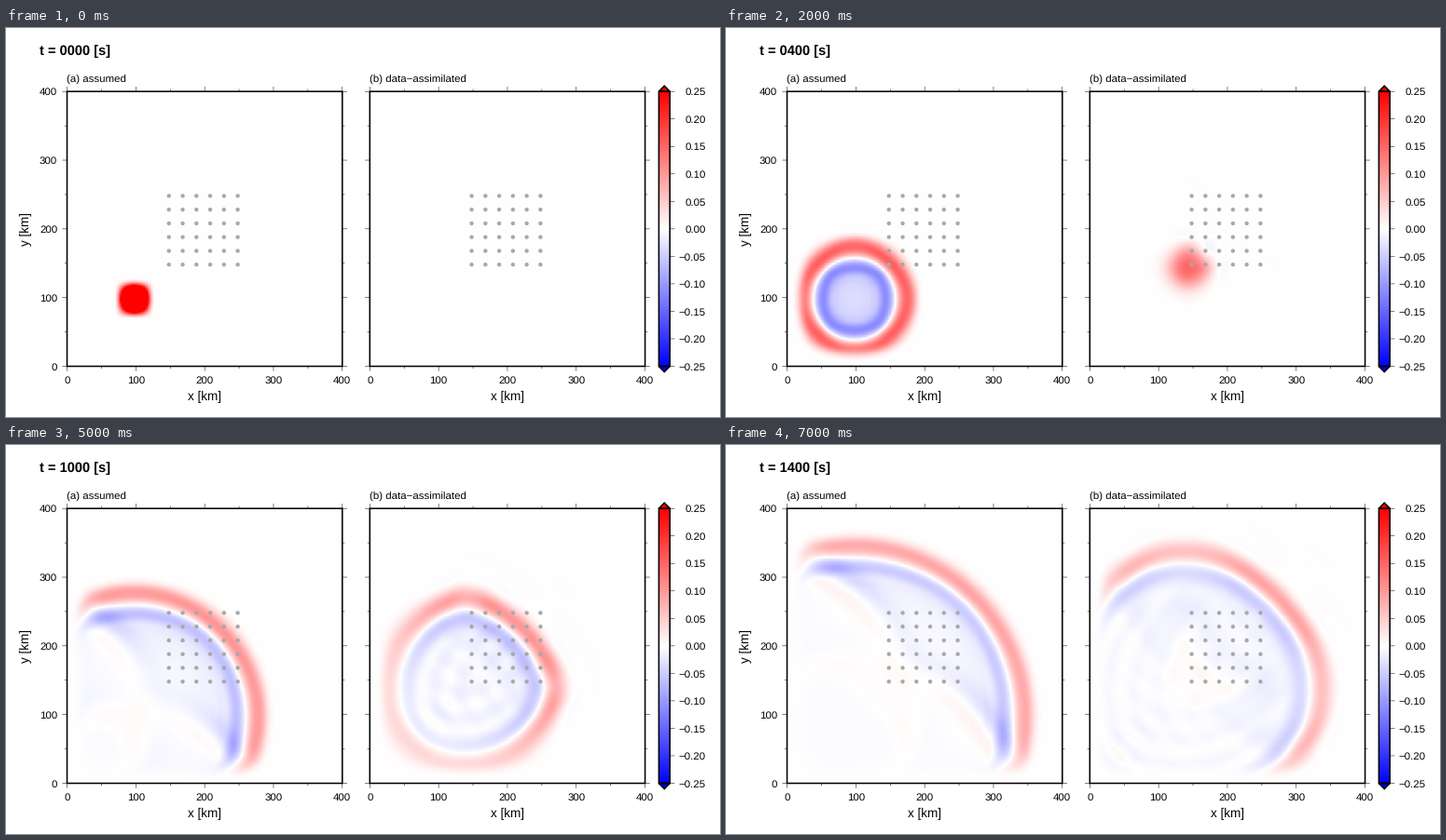
A matplotlib script that plays this animation: 766x418 px, repeating every 8 s.

```python
import math

import numpy as np
import matplotlib.pyplot as plt
from matplotlib.animation import FuncAnimation
from matplotlib.colors import LinearSegmentedColormap
from matplotlib.patches import Circle, Polygon, Rectangle

W, H, DPI = 766, 418, 64
FRAMES, INTERVAL = 8, 1000
STEPS = 200                     # simulated seconds per frame

# --- wave model: linear long waves on a staggered grid ---
N = 200                         # cells per side
DX, DT = 2000.0, 1.0            # metres, seconds
GRAVITY, DEPTH = 9.8, 3000.0
SPONGE, DAMP = 20, 0.015        # absorbing border: cells, strength
SOURCE, BUMP = 49, 30e3         # source cell, half width in metres
CORR = 20e3                     # correlation length of the assimilation
STATIONS = np.arange(74, 125, 10)


def source_profile():
    d = (np.arange(N) - SOURCE) * DX
    return np.where(abs(d) < BUMP, (1 + np.cos(np.pi * d / BUMP)) / 2, 0)


def sponge():
    edge = np.minimum(np.arange(1, N + 1), np.arange(N, 0, -1))
    g = np.exp(-(DAMP * np.clip(SPONGE - edge, 0, None)) ** 2)
    return np.outer(g, g).astype(np.float32)


def gain(rows, cols):
    """Optimal interpolation weights from the stations to every cell."""
    def cov(r, c):
        d2 = (r[:, None] - rows) ** 2 + (c[:, None] - cols) ** 2
        return np.exp(-d2 * (DX / CORR) ** 2)

    r, c = np.indices((N, N)).reshape(2, -1)
    inv = np.linalg.inv(cov(rows, cols) + np.eye(len(rows)))
    return (cov(r, c) @ inv).astype(np.float32)


def simulate():
    """Heights of the assumed and the assimilated sea at each frame."""
    rows, cols = (a.ravel() for a in np.meshgrid(STATIONS, STATIONS))
    weights, damp = gain(rows, cols), sponge()
    eta, u, v = np.zeros((3, 2, N, N), np.float32)
    p = source_profile()
    eta[0] = np.outer(p, p)
    a, b = np.float32(GRAVITY * DEPTH * DT / DX), np.float32(DT / DX)
    shots = [eta.copy()]
    for step in range(1, (FRAMES - 1) * STEPS + 1):
        u[:, :, 1:] -= a * (eta[:, :, 1:] - eta[:, :, :-1])
        v[:, 1:] -= a * (eta[:, 1:] - eta[:, :-1])
        u *= damp
        v *= damp
        eta += b * (u + v)
        eta[:, :, :-1] -= b * u[:, :, 1:]
        eta[:, :-1] -= b * v[:, 1:]
        eta *= damp
        miss = eta[0, rows, cols] - eta[1, rows, cols]
        eta[1] += (weights @ miss).reshape(N, N)
        if step % STEPS == 0:
            shots.append(eta.copy())
    return shots


# --- stage, in pixels from the top left ---
plt.rcParams.update({"font.family": "Liberation Sans", "path.snap": False,
                     "text.hinting": "none"})
PT = 72 / DPI
SIDE = 295.3
KM = SIDE / 400
BOTTOM = 363.5
TOP = BOTTOM - SIDE
LEFTS = (65.5, 390.3)
SMALL, MEDIUM, LARGE = 11.46, 13.54, 14.58
SUB = 4                         # samples per pixel along each axis
LIMIT = 0.25
POLAR = LinearSegmentedColormap.from_list(
    "polar", [(0, 0, 1), (1, 1, 1), (1, 0, 0)], N=512)

fig = plt.figure(figsize=(W / DPI, H / DPI), dpi=DPI, facecolor="white")
ax = fig.add_axes([0, 0, 1, 1])
ax.axis("off")


def label(x, y, s, size=SMALL, **kw):
    kw.setdefault("va", "baseline")
    return ax.text(x, y, s, fontsize=size * PT, color="black", **kw)


def line(xs, ys):
    ax.plot(xs, ys, color="black", lw=0.5 * PT, solid_capstyle="butt",
            zorder=4)


def outline(patch, face="none"):
    patch.set(facecolor=face, edgecolor="black", linewidth=1.56 * PT,
              zorder=5, joinstyle="miter")
    ax.add_patch(patch)


def subpixels(lo, hi):
    """Sample positions in the whole pixels that cover lo to hi."""
    lo, hi = math.floor(lo), math.ceil(hi)
    return lo + (np.arange((hi - lo) * SUB) + 0.5) / SUB


def field(data, x):
    """Pixel image in the row of the panels, starting at x."""
    return fig.figimage(data, math.floor(x), H - math.ceil(BOTTOM),
                        cmap=POLAR, vmin=-LIMIT, vmax=LIMIT, origin="upper",
                        zorder=-1)


def cells(pos):
    return np.clip(np.rint(pos / KM / 2), 0, N - 1).astype(int)


def pixels(eta, x0):
    """Sea heights averaged over the pixels of the panel at x0."""
    cols = cells(subpixels(x0, x0 + SIDE) - x0)
    rows = cells(BOTTOM - subpixels(TOP, BOTTOM))
    fine = np.clip(eta, -LIMIT, LIMIT)[np.ix_(rows, cols)]
    return fine.reshape(len(rows) // SUB, SUB, -1, SUB).mean(axis=(1, 3))


def panel(x0, name):
    right = x0 + SIDE
    for km in range(0, 401, 50):
        size = 2.6 if km % 100 else 5.2
        x, y = x0 + km * KM, BOTTOM - km * KM
        line([x, x], [BOTTOM, BOTTOM + size])
        line([x, x], [TOP, TOP - size])
        line([x0, x0 - size], [y, y])
        line([right, right + size], [y, y])
        if km % 100 == 0:
            label(x, 382, str(km), ha="center")
    label(x0 + SIDE / 2, 400, "x [km]", MEDIUM, ha="center")
    label(x0 - 0.5, 58.4, name)
    outline(Rectangle((x0, TOP), SIDE, SIDE))
    for i in STATIONS * 2:
        for j in STATIONS * 2:
            ax.add_patch(Circle((x0 + i * KM, BOTTOM - j * KM), 2.2, lw=0,
                                color="#a9a9a9", zorder=3))
    return field(pixels(np.zeros((N, N)), x0), x0)


def colorbar(x0, x1):
    mid, centre = (x0 + x1) / 2, (TOP + BOTTOM) / 2
    ramp = (centre - subpixels(TOP, BOTTOM)[::SUB]) / SIDE * 2 * LIMIT
    wide = math.ceil(x1) - math.floor(x0)
    field(np.repeat(ramp[:, None], wide, axis=1), x0)
    for y, tip, face in ((TOP, -6, "red"), (BOTTOM, 6, "blue")):
        outline(Polygon([(x0, y), (mid, y + tip), (x1, y)]), face)
    outline(Rectangle((x0, TOP), x1 - x0, SIDE))
    for i in range(-5, 6):
        y = centre - i * SIDE / 10
        line([x1, x1 + 5.2], [y, y])
        text = f"{i * 0.05:.2f}".replace("-", "\u2212")
        label(750.5, y + 4.1, text, ha="right")


seas = [panel(x, s) for x, s in
        zip(LEFTS, ("(a) assumed", "(b) data\u2212assimilated"))]
colorbar(700.4, 712.2)
for km in range(0, 401, 100):
    label(55.2, BOTTOM - km * KM + 4.1, str(km), ha="right")
label(28.5, (TOP + BOTTOM) / 2, "y [km]", MEDIUM, rotation=90, ha="right",
      va="center")
clock = label(36, 29.2, "", LARGE, weight="bold")
ax.set(xlim=(0, W), ylim=(H, 0))

shots = simulate()


def draw(n):
    for sea, eta, x0 in zip(seas, shots[n], LEFTS):
        sea.set_data(pixels(eta, x0))
    clock.set_text(f"t = {n * STEPS:04d} [s]")
    return [*seas, clock]


anim = FuncAnimation(fig, draw, frames=FRAMES, interval=INTERVAL, repeat=True,
                     repeat_delay=0, blit=False)
plt.show()
```
